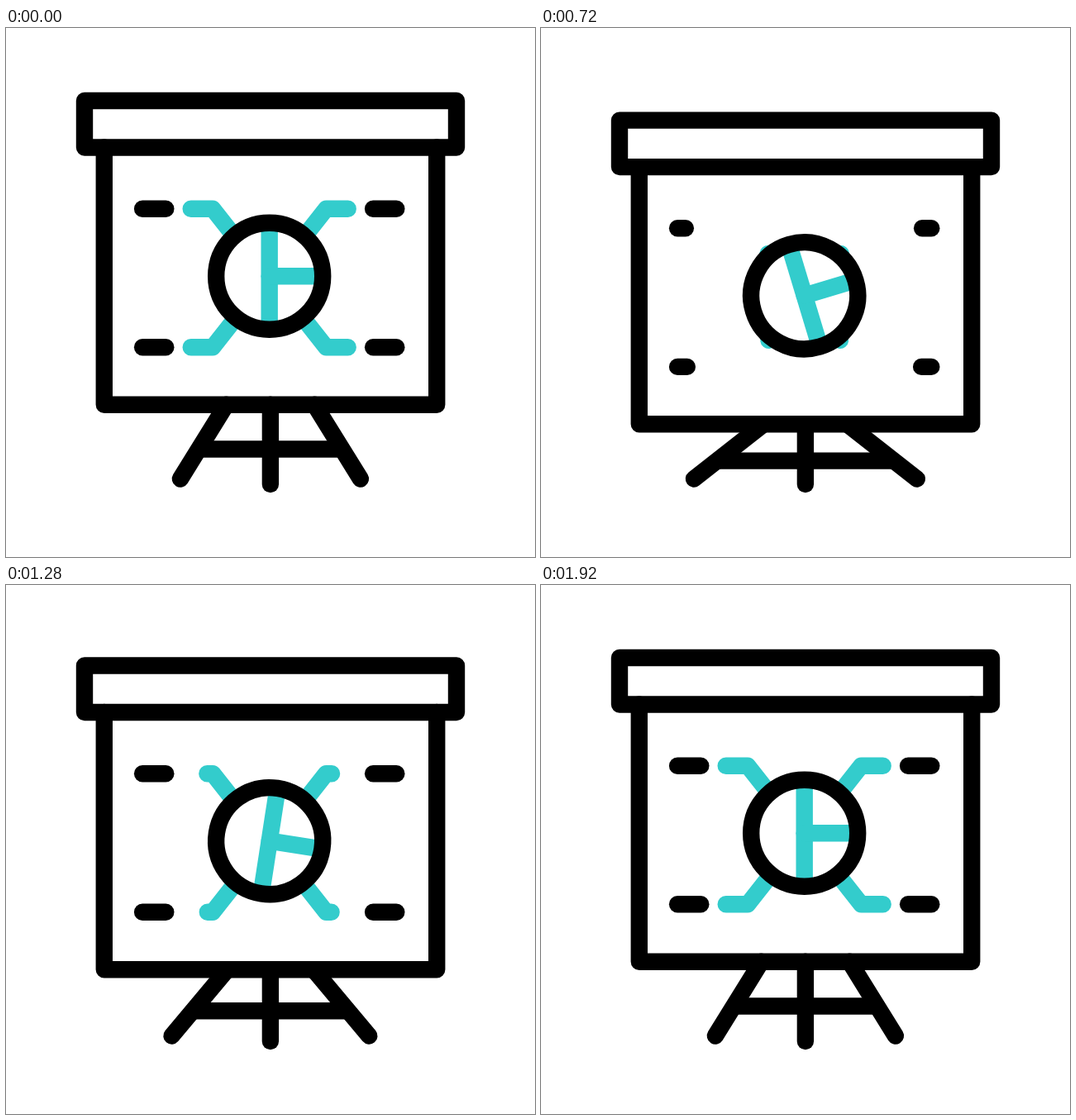
Animation of 640x640 px, one loop 2 s. Source, as an HTML page with a canvas:

```html
<!DOCTYPE html>
<html lang="en">
<head>
<meta charset="utf-8">
<title>Presentation board</title>
<style>
  html, body { margin: 0; width: 100%; height: 100%; overflow: hidden; background: #fff; }
  canvas { display: block; width: 100vmin; height: 100vmin; }
</style>
</head>
<body>
<canvas id="stage" width="640" height="640"></canvas>
<script>
const ctx = document.getElementById('stage').getContext('2d');
const LOOP = 2000, STEP = 40;
const BLACK = '#000', TEAL = '#33cccc';
const CX = 318.7, CY = 300.2;

// Eased keyframes: [time, value] pairs
const LIFT = [[115, 0], [880, 26.6], [1550, 0]];
const SWING = [[280, 0], [910, -21.5], [1340, 10.5], [1920, 0]];
const RETRACT = [[270, 0], [870, 1], [1480, 0]];
const SHRINK = [[205, 0], [680, 1], [1120, 0]];

function track(keys, t) {
  if (t <= keys[0][0]) return keys[0][1];
  for (let i = 1; i < keys.length; i++) {
    const [t0, a] = keys[i - 1], [t1, b] = keys[i];
    if (t < t1) {
      const s = (t - t0) / (t1 - t0);
      return a + (b - a) * s * s * (3 - 2 * s);
    }
  }
  return keys[keys.length - 1][1];
}

function line(color, points, cap = 'round', closed = false) {
  ctx.strokeStyle = color;
  ctx.lineCap = cap;
  ctx.beginPath();
  points.forEach(([x, y]) => ctx.lineTo(x, y));
  if (closed) ctx.closePath();
  ctx.stroke();
}

// Drop the first `cut` pixels of a polyline
function trim(points, cut) {
  const rest = points.slice();
  while (rest.length > 1) {
    const [[x0, y0], [x1, y1]] = rest;
    const len = Math.hypot(x1 - x0, y1 - y0);
    if (cut < len) {
      const k = cut / len;
      rest[0] = [x0 + (x1 - x0) * k, y0 + (y1 - y0) * k];
      return rest;
    }
    cut -= len;
    rest.shift();
  }
  return rest;
}

function drawStand(lift) {
  const barY = 509.5 + 0.6 * lift;
  const topY = 455.7 + lift, footY = 545.5;
  const topX = 53.3 - 0.12 * lift, footX = 109 + 1.1 * lift;
  const barX = topX + (footX - topX) * (barY - topY) / (footY - topY);
  for (const side of [-1, 1]) {
    line(BLACK, [[319.9 + side * topX, topY], [319.9 + side * footX, footY]]);
  }
  line(BLACK, [[319.9 - barX, barY], [319.9 + barX, barY]], 'butt');
  line(BLACK, [[319.9, topY], [319.9, 552]]);
}

function drawBoard() {
  line(BLACK, [[118.8, 144.5], [118.8, 455.7], [521.2, 455.7], [521.2, 144.5]]);
  line(BLACK, [[95, 88], [545, 88], [545, 144.5], [95, 144.5]], 'butt', true);
}

function drawLabels(t) {
  const pull = track(RETRACT, t), shrink = track(SHRINK, t);
  const corners = [
    [-1, -1, 18.9], [1, -1, 17.4],
    [-1, 1, 16.9], [1, 1, 16.4]
  ];
  for (const [sx, sy, loss] of corners) {
    const y = sy < 0 ? 218.7 : 386.3;
    const at = d => CX + sx * d;
    const arm = [[at(95), y], [at(68.6), y], [at(35.5), y - sy * 42]];
    line(TEAL, trim(arm, pull * (sy < 0 ? 78 : 79.8)));
    line(BLACK, [[at(153.6), y], [at(125.4 + shrink * loss), y]]);
  }
}

function drawChart(angle) {
  ctx.save();
  ctx.translate(CX, CY);
  ctx.beginPath();
  ctx.arc(0, 0, 64.5, 0, Math.PI * 2);
  ctx.fillStyle = '#fff';
  ctx.fill();
  ctx.rotate(angle * Math.PI / 180);
  line(TEAL, [[0, -60], [0, 60]], 'butt');
  line(TEAL, [[0, 0], [60, 0]], 'round');
  ctx.strokeStyle = BLACK;
  ctx.beginPath();
  ctx.arc(0, 0, 64.5, 0, Math.PI * 2);
  ctx.stroke();
  ctx.restore();
}

function draw(t) {
  const lift = track(LIFT, t);
  ctx.fillStyle = '#fff';
  ctx.fillRect(0, 0, 640, 640);
  ctx.lineWidth = 20.4;
  ctx.lineJoin = 'round';
  drawStand(lift);
  ctx.save();
  ctx.translate(0, lift);
  drawBoard();
  drawLabels(t);
  drawChart(track(SWING, t));
  ctx.restore();
}

let start = null;
function tick(now) {
  if (start === null) start = now;
  const t = Math.max(0, now - start) % LOOP;
  draw(Math.floor(t / STEP) * STEP);
  requestAnimationFrame(tick);
}
draw(0);
requestAnimationFrame(tick);
</script>
</body>
</html>
```
